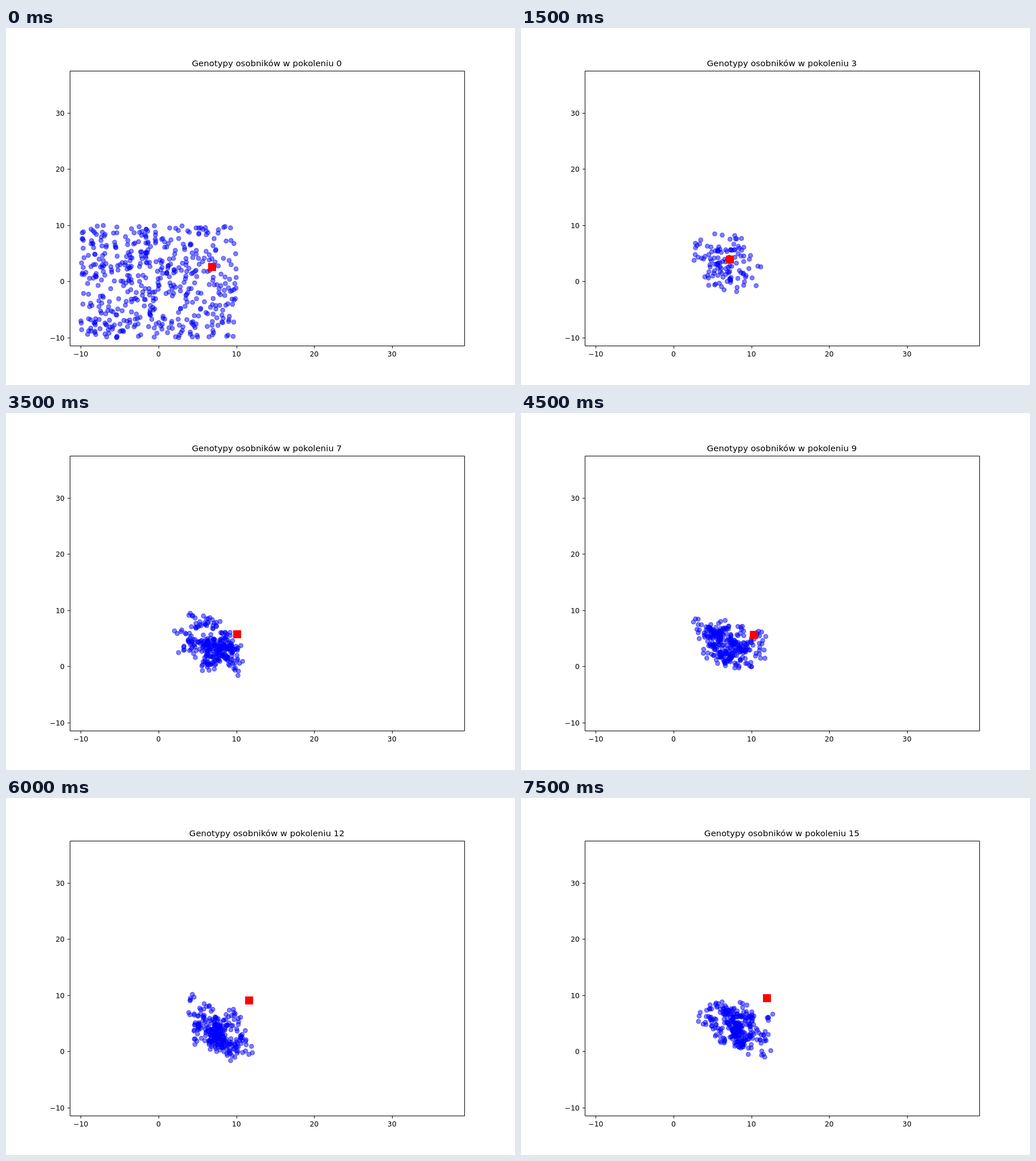
Recreate the animation shown at these times as an HTML page. Size 894 by 626 pixels, loop 8 s.

```html
<!DOCTYPE html>
<html lang="pl">
<head>
<meta charset="utf-8">
<style>
html, body { margin: 0; width: 894px; height: 626px; overflow: hidden; background: #fff; }
svg { display: block; font: 12.42px "DejaVu Sans", sans-serif; }
.axes { fill: none; stroke: #000; }
.dots { fill: #00f; stroke: #00f; fill-opacity: .5; stroke-opacity: .5; stroke-width: 1.24; }
</style>
</head>
<body>
<svg width="894" height="626" viewBox="0 0 894 626">
  <g class="dots" id="dots"></g>
  <rect id="target" width="14" height="14" fill="#f00"/>
  <path class="axes" id="axes"/>
  <g id="labels"></g>
  <text id="title" x="458.2" y="67" font-size="14.9" text-anchor="middle"></text>
</svg>
<script>
const $ = id => document.getElementById(id);
const STEP = 500, GENERATIONS = 16, DOT_RADIUS = 3.73;

// Waypoints of the wandering optimum: generation, x, y.
const PATH = [[0, 362, 419], [3, 367, 405.5], [5, 375, 401], [7, 406, 387.5],
  [9, 408.5, 388.5], [12, 426.5, 354.5], [15, 431.5, 351]];

// Data units to pixels.
const toX = v => 268.03 + 13.663 * v;
const toY = v => 444.6 - 9.84 * v;

function randomSource(seed) {
  return () => {
    seed = seed + 0x6D2B79F5 | 0;
    let t = Math.imul(seed ^ seed >>> 15, 1 | seed);
    t = t + Math.imul(t ^ t >>> 7, 61 | t) ^ t;
    return ((t ^ t >>> 14) >>> 0) / 4294967296;
  };
}

function targetAt(gen) {
  const i = Math.max(1, PATH.findIndex(point => point[0] >= gen));
  const [g0, x0, y0] = PATH[i - 1], [g1, x1, y1] = PATH[i];
  const k = (gen - g0) / (g1 - g0);
  return [x0 + (x1 - x0) * k, y0 + (y1 - y0) * k];
}

function population(gen) {
  const random = randomSource(gen * 97 + 11);
  const many = (count, make) => Array.from({ length: count }, make);
  if (gen === 0) {
    return many(500, () => [toX(random() * 20 - 10), toY(random() * 20 - 10)]);
  }

  // Children gather around parents; the cloud drifts, flattens and tilts with age.
  const bell = () => (random() + random() + random() - 1.5) * 2;
  const centreX = 355 + gen * gen / 10, centreY = 420 - gen * 1.3;
  const height = 22 - gen / 3, tilt = gen / 50;
  const parents = many(60, () => {
    const dx = bell() * 24;
    return [centreX + dx, centreY + bell() * height + dx * tilt];
  });
  return many(Math.min(290, 30 + 10 * gen * gen), (_, i) => {
    const [x, y] = parents[i % parents.length];
    return [x + bell() * 6, y + bell() * 5];
  });
}

const scenes = Array.from({ length: GENERATIONS }, (_, gen) => ({
  target: targetAt(gen),
  dots: population(gen).map(([x, y]) =>
    `<circle cx="${x.toFixed(1)}" cy="${y.toFixed(1)}" r="${DOT_RADIUS}"/>`).join('')
}));

function drawAxes() {
  let path = 'M112.5 75.5H805.5V557.5H112.5Z', labels = '';
  for (let value = -10; value <= 30; value += 10) {
    const x = toX(value), y = toY(value);
    const label = String(value).replace('-', '\u2212');
    path += `M${Math.round(x) + .5} 557.5v4.35M112.5 ${Math.floor(y) + .5}h-4.35`;
    labels += `<text x="${x}" y="576" text-anchor="middle">${label}</text>`
      + `<text x="103" y="${Math.round(y + 4.5)}" text-anchor="end">${label}</text>`;
  }
  $('axes').setAttribute('d', path);
  $('labels').innerHTML = labels;
}

let shown = -1;
function draw(gen) {
  const { dots, target: [x, y] } = scenes[gen];
  $('dots').innerHTML = dots;
  $('target').setAttribute('x', Math.round(x - 7));
  $('target').setAttribute('y', Math.round(y - 7));
  $('title').textContent = `Genotypy osobników w pokoleniu ${gen}`;
  shown = gen;
}

function tick() {
  const gen = Math.floor(performance.now() / STEP) % GENERATIONS;
  if (gen !== shown) draw(gen);
  requestAnimationFrame(tick);
}
drawAxes();
tick();
</script>
</body>
</html>
```
